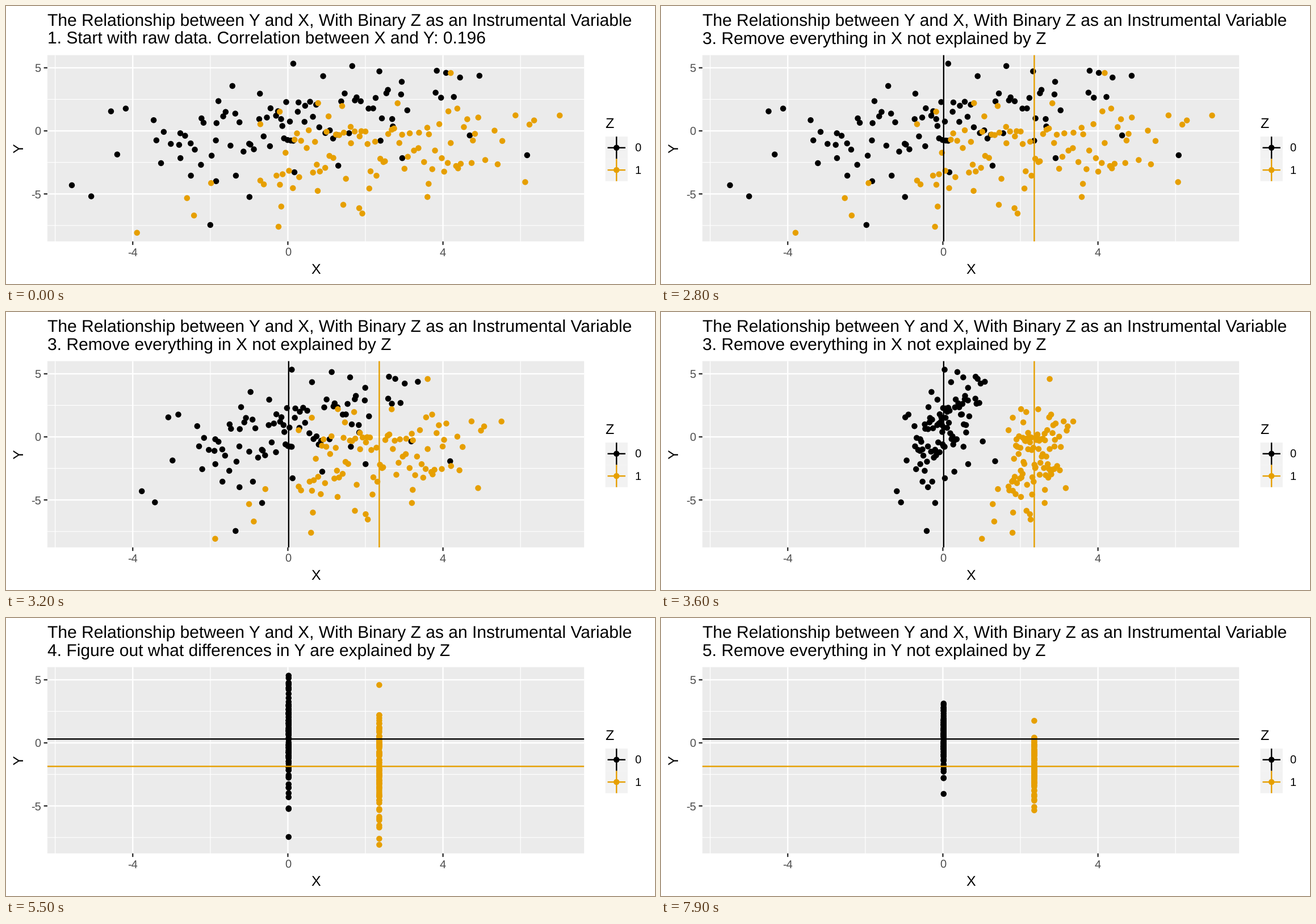
A matplotlib script that plays this animation: 1143x490 px, repeating every 8000 ms.

```python
import numpy as np
import matplotlib.pyplot as plt
from matplotlib.animation import FuncAnimation
from matplotlib.patches import Rectangle

plt.rcParams.update({"font.family": "Liberation Sans", "text.hinting": "none",
                     "toolbar": "None"})

W, H, DPI = 1143, 490, 100
PT = 72 / DPI
LEFT, RIGHT, TOP, BOTTOM = 72.9, 1018.1, 86.6, 414.9
BLACK, GOLD = "#000000", "#E69F00"
THICK, THIN = 2.42, 1.21
STEPS = 13
MEAN_X = np.array([0.02, 2.357])
MEAN_Y = np.array([0.305, -1.865])

TITLE = "The Relationship between Y and X, With Binary Z as an Instrumental Variable"
STAGES = [
    (0, "1. Start with raw data. Correlation between X and Y: 0.196"),
    (5, "2. Figure out what differences in X are explained by Z"),
    (28, "3. Remove everything in X not explained by Z"),
    (51, "4. Figure out what differences in Y are explained by Z"),
    (74, "5. Remove everything in Y not explained by Z"),
]

# Outlying points of each group; the dense middle is seeded.
RIM0 = [(-5.57, -4.31), (-5.07, -5.19), (-4.56, 1.55), (-4.18, 1.77), (-4.4, -1.87),
        (-3.46, .85), (-3.2, -.08), (-3.39, -.75), (-3.27, -2.56), (-2.77, -2.16),
        (-2.24, -2.69), (-2.5, -3.55), (-2, -7.46), (-1.85, -3.99), (-1.34, -3.55),
        (-.99, -5.24), (-1.79, 2.36), (-1.43, 3.56), (-.72, 2.95), (.14, 5.33),
        (.91, 4.34), (1.66, 5.14), (2.36, 4.72), (2.58, 3.25), (2.92, 2.89),
        (3.08, 1.63), (3.84, 4.77), (4.08, 4.6), (4.44, 4.23), (4.94, 4.37),
        (3.81, 3.03), (3.95, 2.63), (4.28, 2.69), (4.69, -.36), (6.17, -1.93),
        (2.95, -2.16), (.17, -3.28), (2.39, -.78), (1.3, -2.76)]
RIM1 = [(-3.89, -8.08), (-2.42, -6.71), (-2.6, -5.33), (-1.98, -4.14), (-.24, -7.6),
        (-.17, -6), (-.71, -3.94), (-.62, -4.24), (-.71, .53), (-.21, 1.52),
        (.78, 2.2), (1.4, 1.97), (1.05, 1.15), (.13, -4.54), (.77, -4.76),
        (1.43, -5.86), (1.84, -6.13), (1.92, -6.55), (2.1, -4.57), (3.6, -5.24),
        (3.63, -4.2), (6.12, -4.06), (5.09, -2.31), (5.41, -2.65), (5.53, -.8),
        (5.33, .02), (4.91, 1.06), (5.87, 1.23), (6.35, .83), (6.23, .5),
        (7.01, 1.22), (4.2, 4.59), (4.37, 1.77), (4.14, 1.55), (2.83, 2.19)]


def px(x):
    return 496.4 + 68.3 * np.asarray(x)


def py(y):
    return 220.1 - 22.23 * np.asarray(y)


def core(rng, n, cx, cy, half, power, slope, spread):
    u = 2 * (np.arange(n) + rng.random(n)) / n - 1
    dx = half * np.sign(u) * np.abs(u) ** power
    return np.column_stack([cx + dx, cy + slope * dx + rng.uniform(-spread, spread, n)])


rng = np.random.default_rng(12)
points = np.vstack([RIM0, core(rng, 61, -.05, .6, 3, 1.3, .55, 1.9),
                    RIM1, core(rng, 65, 2.3, -1.6, 2.6, 1, .24, 2.1)])
group = np.repeat([0, 1], 100)
colors = np.array([BLACK, GOLD])[group]

fig = plt.figure(figsize=(W / DPI, H / DPI), dpi=DPI, facecolor="white")
ax = fig.add_axes([0, 0, 1, 1])
ax.set(xlim=(0, W), ylim=(H, 0))
ax.axis("off")


def rect(x, y, w, h, color):
    return ax.add_patch(Rectangle((x, y), w, h, fc=color, lw=0, snap=False, zorder=0))


def line(xs, ys, color, width, z):
    return ax.plot(xs, ys, color=color, lw=width * PT, zorder=z,
                   solid_capstyle="butt", snap=False)[0]


def vline(x, color, width=THICK, z=3):
    return line([x, x], [TOP, BOTTOM], color, width, z)


def hline(y, color, width=THICK, z=3):
    return line([LEFT, RIGHT], [y, y], color, width, z)


def text(x, y, s, size, color="black", **kw):
    return ax.text(x, y, s, fontsize=size * PT, color=color, va="baseline", **kw)


def dots(x, y, c):
    return ax.scatter(x, y, s=(10.45 * PT) ** 2, c=c, linewidths=0, zorder=2)


# Panel, grid and axes
panel = rect(LEFT, TOP, RIGHT - LEFT, BOTTOM - TOP, "#EBEBEB")
for x in (-6, -2, 2, 6):
    vline(px(x), "white", THIN, 1)
for y in (-7.5, -2.5, 2.5):
    hline(py(y), "white", THIN, 1)
for x in (-4, 0, 4):
    vline(px(x), "white", THICK, 1)
    line([px(x)] * 2, [BOTTOM, BOTTOM + 6.25], "#333333", THICK, 1)
    text(px(x), 440.7, str(x), 20, "#4D4D4D", ha="center")
for y in (-5, 0, 5):
    hline(py(y), "white", THICK, 1)
    line([LEFT - 6.25, LEFT], [py(y)] * 2, "#333333", THICK, 1)
    text(61.7, py(y) + 7.2, str(y), 20, "#4D4D4D", ha="right")
text(545.5, 472, "X", 25, ha="center")
text(30.5, 250.7, "Y", 25, ha="center", rotation=90, rotation_mode="anchor")
text(73, 34.4, TITLE, 30)
subtitle = text(73, 66.8, "", 30)

# Legend
KEY = 39.27
text(1055.5, 215, "Z", 25)
for i, c in enumerate((BLACK, GOLD)):
    top = 230.2 + KEY * i
    mid = top + KEY / 2
    rect(1055.6, top, KEY, KEY, "#F2F2F2")
    line([1075.2] * 2, [top, top + KEY], c, THICK, 3)
    line([1059.5, 1090.9], [mid] * 2, c, THICK, 3)
    text(1107, mid + 7.2, str(i), 20)
dots([1075.2] * 2, 230.2 + KEY * np.array([.5, 1.5]), [BLACK, GOLD])

cloud = dots(px(points[:, 0]), py(points[:, 1]), colors)
cloud.set_clip_path(panel)
x_means = [vline(px(m), c) for m, c in zip(MEAN_X, (BLACK, GOLD))]
y_means = [hline(py(m), c) for m, c in zip(MEAN_Y, (BLACK, GOLD))]


def ease(step):
    t = np.clip(step / STEPS, 0, 1)
    return (1 - np.cos(np.pi * t)) / 2


def draw(i):
    subtitle.set_text([s for start, s in STAGES if i >= start][-1])
    x = points[:, 0] + (MEAN_X[group] - points[:, 0]) * ease(i - 27)
    y = points[:, 1] + (MEAN_Y[group] - points[:, 1]) * ease(i - 73)
    cloud.set_offsets(np.column_stack([px(x), py(y)]))
    for ln in x_means:
        ln.set_visible(9 <= i < 51)
    for ln in y_means:
        ln.set_visible(i >= 55)
    return [subtitle, cloud, *x_means, *y_means]


anim = FuncAnimation(fig, draw, frames=80, interval=100, repeat=True,
                     repeat_delay=0, blit=False)
plt.show()
```
